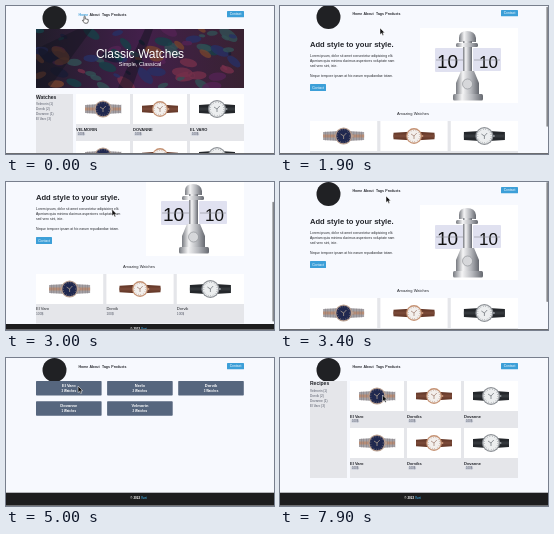
An HTML page for the animation above (8 s loop, 268 by 148 pixels).

```html
<!DOCTYPE html>
<html lang="en">
<head>
<meta charset="utf-8">
<title>Watch shop</title>
<style>
  html, body { margin: 0; width: 100%; height: 100%; overflow: hidden; background: #f7f9fe; }
  svg { display: block; width: 268px; height: 148px; font-family: "Liberation Sans", Arial, sans-serif; }
</style>
</head>
<body>
<svg id="stage" viewBox="0 0 268 148"></svg>
<script>
const LOOP = 8000, STEP = 100;
const BLUE = '#3c9fd8', INK = '#24262c', GREY = '#e5e6ea';

const rect = (x, y, w, h, fill, more = '') =>
  `<rect x="${x}" y="${y}" width="${w}" height="${h}" fill="${fill}" ${more}/>`;
const circle = (x, y, r, fill, more = '') =>
  `<circle cx="${x}" cy="${y}" r="${r}" fill="${fill}" ${more}/>`;
const path = (d, fill, more = '') => `<path d="${d}" fill="${fill}" ${more}/>`;
const text = (x, y, size, label, fill = INK, more = '') =>
  `<text x="${x}" y="${y}" font-size="${size}" fill="${fill}" ${more}>${label}</text>`;
const BOLD = 'font-weight="700"', MID = 'text-anchor="middle"';

function button(x, y, w, h) {
  return rect(x, y, w, h, BLUE, 'rx=".6"') +
    text(x + w / 2, y + h / 2 + 1.2, 3.4, 'Contact', '#fff', MID);
}

const LINKS = [['Home', 72.5], ['About', 83.5], ['Tags', 96], ['Products', 105.3]];
const header = () => circle(48.5, 12, 12, '#202124') +
  LINKS.map(([label, x]) => text(x, 9.8, 3.5, label, INK, `${BOLD} data-link="${label}"`)).join('') +
  button(221, 5, 17, 6.3);

const footer = y => rect(0, y, 268, 13.5, '#1d1d1e') +
  text(132.5, y + 6.4, 3, `© 2022 <tspan fill="${BLUE}">Vuri</tspan>`, '#fff', `${MID} ${BOLD}`);

const STYLES = [
  { strap: '#a5a1a5', stripe: '#b88d76', bezel: '#b9a091', dial: '#20284f', hand: '#d9c3a5', r: 8.6, h: 5.3 },
  { strap: '#683b2b', stripe: '#784837', bezel: '#c59273', dial: '#f3efec', hand: '#8b6252', r: 7.9, h: 4.5 },
  { strap: '#24272b', stripe: '#34383c', bezel: '#8d9196', dial: '#eceeef', hand: '#4b5158', r: 9, h: 5.2 }
];

function watch(cx, cy, kind, width) {
  const s = STYLES[kind], half = width / 2, end = s.h - 1.2;
  let out = path(`M${cx - half} ${cy - end}L${cx} ${cy - s.h}L${cx + half} ${cy - end}V${cy + end}
    L${cx} ${cy + s.h}L${cx - half} ${cy + end}Z`, s.strap);
  out += rect(cx - half, cy - 1.5, width, 3, s.stripe);
  if (kind === 0) {
    for (let x = -half + 2; x < half; x += 2.6) out += rect(cx + x, cy - 4.4, .4, 8.8, '#797479');
  }
  out += rect(cx + s.r - .5, cy - 1, 1.8, 2, s.bezel);
  out += circle(cx, cy, s.r, s.bezel) + circle(cx, cy, s.r - 1.3, s.dial);
  out += circle(cx, cy, s.r - 2.3, 'none', `stroke="${s.hand}" stroke-width=".7" stroke-dasharray=".5 2"`);
  return out + path(`M${cx - 3} ${cy - 2}L${cx} ${cy}L${cx + 2.8} ${cy - 3}M${cx} ${cy}V${cy + 3}`,
    'none', `stroke="${s.hand}" stroke-width=".6"`);
}

function wideCard(x, y, kind, name) {
  return rect(x, y, 67.2, 30, '#fff') + watch(x + 33.6, y + 15, kind, 41) +
    text(x, y + 36, 4.1, name) + text(x, y + 41, 3.3, '100$', '#555a68');
}

function smallCard(x, y, kind, name) {
  return rect(x, y, 54, 30, '#fff') + watch(x + 27, y + 15, kind, 36) +
    text(x, y + 36.5, 4, name, INK, BOLD) +
    rect(x + 1, y + 38.3, 8.2, 3.6, '#d3d6df', 'rx="1.6"') +
    text(x + 5.1, y + 41.2, 2.9, '100$', '#4a5061', MID);
}

const WIDE_X = [30, 100.4, 170.8], SMALL_X = [70, 127, 184];

function catalogue(y, title, titleY, rows) {
  const list = ['Velmorin (1)', 'Dorvik (2)', 'Dovanne (1)', 'El Varo (3)'];
  return rect(30, y, 37, 97, GREY) + rect(70, y, 168, 97, GREY) +
    text(30, titleY, 5, title, INK, BOLD) +
    list.map((label, i) => text(30, y + 11.3 + i * 4.8, 3.2, label, '#555a68')).join('') +
    rows.map((names, r) => names.map((name, i) =>
      smallCard(SMALL_X[i], y + r * 47, i, name)).join('')).join('');
}

function hero() {
  let seed = 11;
  const random = () => (seed = seed * 16807 % 2147483647) / 2147483647;
  const tones = ['#174047', '#542354', '#74304a', '#273064', '#74422d', '#181b35', '#325055'];
  let out = `<linearGradient id="cloth"><stop stop-color="#211d2a"/><stop offset=".5" stop-color="#42204a"/>
    <stop offset="1" stop-color="#382232"/></linearGradient>
    <clipPath id="frame">${rect(30, 23, 208, 59, '#000')}</clipPath>
    <g clip-path="url(#frame)">${rect(30, 23, 208, 59, 'url(#cloth)')}`;
  for (let i = 0; i < 80; i++) {
    const x = 30 + random() * 208, y = 23 + random() * 59, r = 2 + random() * 5;
    const tone = tones[Math.floor(random() * tones.length)];
    out += `<ellipse cx="${x}" cy="${y}" rx="${r * 1.5}" ry="${r * .7}" fill="${tone}" opacity=".8"
      transform="rotate(${random() * 70 - 20} ${x} ${y})"/>`;
  }
  out += path('M30 43L72 23H86L43 82H30ZM112 82L139 23H147L126 82Z', '#151421', 'opacity=".5"') + '</g>';
  return out + text(134, 51.5, 12, 'Classic Watches', '#fff', MID) +
    text(134, 60, 5.6, 'Simple, Classical', '#fff', MID);
}

function flipClock() {
  const line = 'stroke="#888b91" stroke-width=".6"';
  return rect(140, 23, 98, 75, '#fff') +
    `<linearGradient id="chrome"><stop stop-color="#777a80"/><stop offset=".3" stop-color="#f4f4f5"/>
      <stop offset=".65" stop-color="#b4b6bb"/><stop offset="1" stop-color="#666970"/></linearGradient>` +
    rect(155, 43, 29, 24, '#e0e1f0', 'rx="1"') + rect(193, 43, 28, 23, '#e0e1f0', 'rx="1"') +
    path('M179 33Q179 26 187 26T196 33V37H179Z', 'url(#chrome)') +
    rect(183, 36, 9, 34, 'url(#chrome)') + rect(176, 38, 22, 4, 'url(#chrome)', 'rx="1.5"') +
    path('M181 66H194L199 78V89H176V78Z', 'url(#chrome)') +
    circle(187.5, 79, 5, '#d6d7da', line) +
    rect(173, 89, 30, 6.5, 'url(#chrome)', 'rx="1.5"') +
    text(157, 62.5, 19, '10', '#111') + text(199, 62.5, 17, '10', '#111') +
    path('M156 55H183M194 55H220', 'none', line);
}

function aboutPage() {
  const lines = [
    [52, 'Lorem ipsum, dolor sit amet consectetur adipisicing elit.'],
    [57.2, 'Aperiam quia minima ducimus asperiores voluptate nam'],
    [62.4, 'sed vero sint, iste.'],
    [72.4, 'Neque tempore ipsam at hic earum repudiandae totam.']
  ];
  return header() + text(30, 42, 7.6, 'Add style to your style.', INK, BOLD) +
    lines.map(([y, label]) => text(30, y, 3.4, label)).join('') + button(30, 79, 16, 7) + flipClock() +
    text(133, 110.4, 4, 'Amazing Watches', INK, MID) + rect(30, 116, 208, 49.5, GREY) +
    ['El Varo', 'Dorvik', 'Dorvik'].map((name, i) => wideCard(WIDE_X[i], 116, i, name)).join('') + footer(166);
}

function tagsPage() {
  const tags = [['El Varo', 3], ['Nerlo', 2], ['Dorvik', 3], ['Dovanne', 1], ['Velmorin', 2]];
  return header() + tags.map(([name, count], i) => {
    const x = 30 + i % 3 * 71.1, y = 23 + Math.floor(i / 3) * 20.2;
    return rect(x, y, 65.6, 14.5, '#56667e', 'rx=".7"') +
      text(x + 32.8, y + 6.2, 4, name, '#fff', `${MID} ${BOLD}`) +
      text(x + 32.8, y + 11, 3, `${count} Watches`, '#fff', `${MID} ${BOLD}`);
  }).join('') + footer(134.7);
}

const tagPage = () => header() + rect(30, 33, 208, 97, GREY) + text(30, 27, 5, 'Watches') +
  ['El Varo', 'Dorviks', 'Dovanne'].map((name, i) => wideCard(WIDE_X[i], 33, i, name)).join('') +
  wideCard(30, 80, 0, 'El Varo') + footer(134.7);

const names = ['El Varo', 'Dorviks', 'Dovanne'];
const pages = [
  [0, header() + hero() + catalogue(88, 'Watches', 93, [['VELMORIN', 'DOVANNE', 'EL VARO'], names])],
  [1200, aboutPage()],
  [3900, tagsPage()],
  [5300, tagPage()],
  [6700, header() + catalogue(23, 'Recipes', 27, [names, names]) + footer(134.7)]
];

const stage = document.getElementById('stage');
stage.innerHTML = rect(0, 0, 268, 148, '#f7f9fe') +
  pages.map(([, markup]) => `<g class="page">${markup}</g>`).join('') +
  rect(266.4, 0, 1.6, 120, '#85878b', 'id="thumb" rx=".8"') + rect(0, 147, 268, 1, '#6c6d70') +
  `<g id="cursor">
    ${path('M0 0V6.6L1.6 5.2L2.7 7.6L3.8 7.1L2.8 4.8H4.8Z', '#111', 'id="arrow" stroke="#fff" stroke-width=".5"')}
    ${path('M0 .5Q.6-.4 1.2.5V2.8L4.2 3.5V5.5L3.4 7.2H.6L-1.6 4.4Q-1.2 3.5 0 4.4Z', '#fff',
      'id="hand" stroke="#111" stroke-width=".6"')}
  </g>`;

const groups = [...stage.querySelectorAll('.page')];
const [thumb, cursor, arrow, hand] = ['thumb', 'cursor', 'arrow', 'hand'].map(id => document.getElementById(id));
const links = [...stage.querySelectorAll('[data-link]')];

// Rows: time, then values.
const POINTER = [
  [0, 78, 10], [700, 87, 9], [1300, 87, 9], [1700, 100, 22], [1900, 100, 22], [2500, 106, 34],
  [2800, 106, 34], [3400, 106, 14], [3600, 106, 13], [4000, 99, 9], [4500, 99, 9], [5000, 72, 28],
  [5600, 72, 28], [6100, 112, 12], [6500, 112, 9], [6800, 112, 9], [7100, 109, 48], [7400, 104, 81],
  [7700, 102, 36], [7800, 102, 36], [7900, 102.5, 37]
];
const SCROLL = [
  [0, 0], [1800, 0], [1900, 1], [2000, 7], [2200, 23], [2300, 29], [2500, 33],
  [2800, 33], [3000, 24], [3200, 8], [3400, 0]
];

function sample(table, t) {
  const next = table.findIndex(row => row[0] > t);
  if (next < 0) return table[table.length - 1].slice(1);
  const a = table[next - 1], b = table[next], k = (t - a[0]) / (b[0] - a[0]);
  return a.slice(1).map((v, i) => v + (b[i + 1] - v) * k);
}

const show = (el, on) => el.setAttribute('visibility', on ? 'visible' : 'hidden');

function draw(now) {
  const t = Math.floor(now % LOOP / STEP) * STEP;
  const current = pages.filter(([start]) => start <= t).length - 1;
  const [scroll] = sample(SCROLL, t);
  groups.forEach((g, i) => {
    show(g, i === current);
    g.setAttribute('transform', `translate(0 ${i === 1 ? -scroll : 0})`);
  });
  show(thumb, t >= 1900 && t < 3900);
  thumb.setAttribute('y', scroll * 27 / 33);
  const hovered = t < 300 ? 'Home' : t >= 500 && t < 1400 ? 'About' : '';
  links.forEach(link => link.setAttribute('fill', link.dataset.link === hovered ? BLUE : INK));
  cursor.setAttribute('transform', `translate(${sample(POINTER, t).join(' ')})`);
  show(hand, hovered);
  show(arrow, !hovered);
  requestAnimationFrame(draw);
}
draw(0);
</script>
</body>
</html>
```
